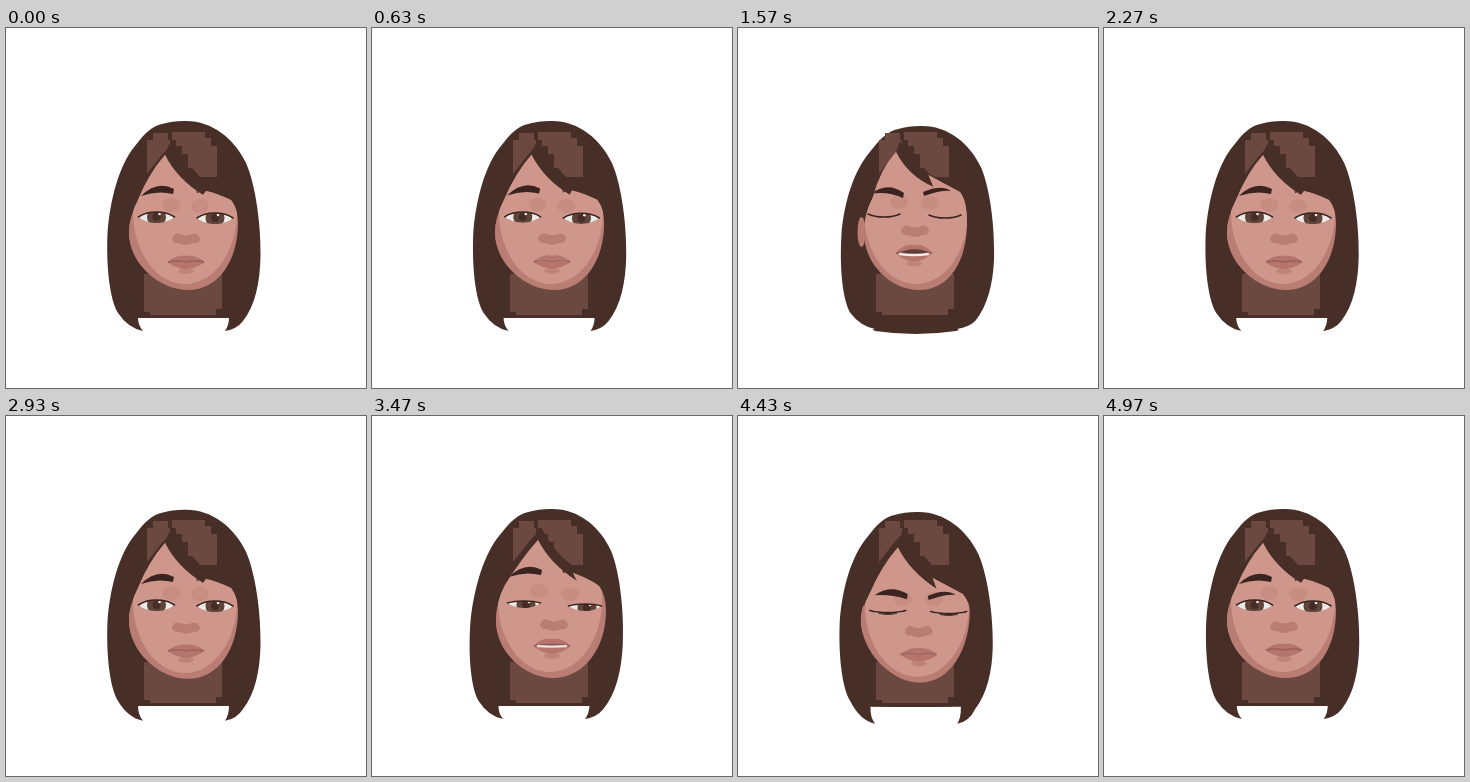
An HTML page that plays this animation: 360 by 360 pixels, repeating every 5 s.

```html
<!DOCTYPE html>
<html lang="en">
<head>
<meta charset="utf-8">
<title>Eye roll</title>
<style>
  html, body { margin: 0; width: 100%; height: 100%; overflow: hidden; background: #fff; }
  svg { display: block; width: 100%; height: 100%; }
  .hair { fill: #472e27; }
  .sheen { fill: #6b4840; }
  .shade { fill: #b97d73; }
  .skin { fill: #cf978b; }
  .white { fill: #eceae6; }
  .iris { fill: #60443a; }
  .pupil { fill: #452c25; }
  .brow { fill: #3b2420; }
  .lid { fill: none; stroke: #3a2420; stroke-width: 1.6; stroke-linecap: round; }
  .lip { fill: #b5756d; }
  .gap { fill: #35201e; }
  .seam { fill: none; stroke: #96605a; stroke-width: 1.3; }
  .teeth { fill: none; stroke: #f1eeeb; stroke-width: 2.4; stroke-linecap: round; }
</style>
</head>
<body>
<svg viewBox="0 0 360 360">
  <defs>
    <clipPath id="faceClip"><path id="faceEdge"/></clipPath>
    <clipPath id="eyeClipL"><path id="eyeEdgeL"/></clipPath>
    <clipPath id="eyeClipR"><path id="eyeEdgeR"/></clipPath>
  </defs>
  <path id="hair" class="hair"/>
  <path class="sheen" d="M147 105H162V112H164V118L155 128 141 146V112H147ZM166 104H199V110H205V118H211V149H194L186 140H182V126H176V118H170V112H166Z"/>
  <path class="sheen" d="M138 246H216V281H210V287H144V284H138Z"/>
  <path id="lock" class="hair"/>
  <ellipse id="ear" class="shade" rx="4" ry="15"/>
  <path id="face" class="shade"/>
  <g clip-path="url(#faceClip)">
    <ellipse id="glow" class="skin" rx="52" ry="72"/>
    <ellipse id="socketL" class="shade" rx="9" ry="7" opacity=".4"/>
    <ellipse id="socketR" class="shade" rx="9" ry="7" opacity=".4"/>
    <path id="nose" class="shade"/>
    <path id="browL" class="brow"/>
    <path id="browR" class="brow"/>
    <g clip-path="url(#eyeClipL)">
      <path id="whiteL" class="white"/>
      <circle id="irisL" class="iris" r="9.5"/>
      <circle id="pupilL" class="pupil" r="4"/>
      <circle id="glintL" class="white" r="1.3"/>
    </g>
    <g clip-path="url(#eyeClipR)">
      <path id="whiteR" class="white"/>
      <circle id="irisR" class="iris" r="9.5"/>
      <circle id="pupilR" class="pupil" r="4"/>
      <circle id="glintR" class="white" r="1.3"/>
    </g>
    <path id="lidL" class="lid"/>
    <path id="lidR" class="lid"/>
    <ellipse id="chin" class="shade" rx="8" ry="3" opacity=".7"/>
    <path id="lip" class="lip"/>
    <path id="seam" class="seam"/>
    <path id="gap" class="gap"/>
    <path id="teeth" class="teeth"/>
  </g>
</svg>
<script>
const FPS = 30, CYCLE = 80, LOOP = 5000;

const rest = {
  x: 0, lean: 0, top: 93, tip: 303, hem: 290, full: 0,  // hair
  px: 159, py: 127, tx: 197, ty: 167, nx: 3, ny: -4,    // parting, fringe tip, notch
  left: 123, right: 232, cx: 182, cy: 262, ear: 0,      // face
  ex: 150.5, ey: 189, fx: 209, fy: 190, half: 18,       // eyes
  up: -5, low: 6, ix: 0, iy: 0,                         // lids, gaze
  bx: 135, by: 168, bi: 161, arch: 152,                 // left brow
  rx: 190, ry: 161,                                     // right brow
  gx: 180, gy: 211, mx: 180, my: 233, open: 0, teeth: 0 // nose, mouth
};
const pose = (changes, base = rest) => ({ ...base, ...changes });

const dip = pose({ tip: 305, top: 94, cy: 263, gy: 212, my: 234 });
const droop = pose({
  x: -3, lean: .03, px: 166, py: 124, tx: 205, ty: 165, nx: -4, ny: -8,
  left: 124, right: 234, cx: 181,
  ex: 152, ey: 187, fx: 213, fy: 190, half: 16.5, up: -2, low: 5, ix: 2, iy: 2,
  bx: 137, by: 161, bi: 154, arch: 145, ry: 153,
  gx: 182, gy: 209, my: 229, open: 1.6, teeth: .9
});
const lookUp = pose({
  x: -3.5, lean: .05, top: 95, tip: 299, hem: 300, full: 1,
  px: 165.5, py: 117, tx: 205, ty: 157, nx: -2, ny: -6, left: 126, right: 235, cy: 261,
  ex: 152.5, ey: 176, fx: 214.5, fy: 178, up: -13, low: 10, ix: -3.5, iy: -3.5,
  bx: 146, by: 144, bi: 139, arch: 134, ry: 143,
  gx: 184, gy: 200, mx: 182, my: 222, open: 5, teeth: 1
});
const shut = pose({
  x: 2, lean: .02, top: 98, tip: 301, hem: 303, full: 1,
  px: 158, py: 124, tx: 195.5, ty: 159, nx: -5, ny: -12,
  left: 126, right: 229, cx: 181, ear: 1,
  ex: 146, ey: 186, fx: 207, fy: 187, half: 16, up: 3, low: 3,
  bx: 133, by: 166, bi: 165, arch: 153, rx: 185, ry: 164,
  gx: 177, gy: 203, mx: 176, my: 224, open: 3, teeth: 1
});
const swing = pose({ x: 4.5, tip: 304, my: 228, gy: 206, open: 1.5, teeth: .5 }, shut);
const lookDown = pose({
  top: 96, tip: 308, px: 160, py: 132, tx: 199, ty: 174, nx: -4, ny: -11, cy: 267,
  ex: 150, ey: 195, fx: 211, fy: 196, up: 2, low: 4.5, iy: 3,
  bx: 137, by: 180, bi: 179, arch: 169, ry: 181,
  gx: 181, gy: 216, mx: 181, my: 238
});

const keys = [
  [0, rest], [300, dip], [560, rest], [800, droop], [1080, lookUp], [1170, lookUp],
  [1540, shut], [1590, shut], [1640, swing], [1750, lookDown], [1800, lookDown],
  [1960, pose({ x: -2 })], [2240, rest], [2330, pose({ x: 1 })],
  [2500, pose({ x: 2 })], [2670, rest]
];

function poseAt(ms) {
  const i = keys.findIndex(k => k[0] > ms);
  const [t0, a] = keys[i - 1], [t1, b] = keys[i];
  const u = (ms - t0) / (t1 - t0), e = u * u * (3 - 2 * u);
  const p = {};
  for (const k in a) p[k] = a[k] + (b[k] - a[k]) * e;
  return p;
}

const el = {};
document.querySelectorAll("[id]").forEach(n => el[n.id] = n);
const path = (id, d) => el[id].setAttribute("d", d);
const place = (id, x, y) => {
  el[id].setAttribute("cx", x);
  el[id].setAttribute("cy", y);
};

function drawHair({ x, lean, top: t, tip, hem, full }) {
  const inset = 5 * full, bend = 6 * (1 - full);
  path("hair", `M178 ${t}C205 ${t - 1} 228 ${t + 17} 240 ${t + 42}
    C250 ${t + 65} 255 ${t + 105} 254.5 ${t + 135}C254 255 249 278 237 293
    Q231 ${tip - 2} 219 ${tip}Q223 ${tip - bend} ${223 - inset} ${hem}
    Q178 ${hem + 6 * full} ${132 + inset} ${hem}Q132 ${tip - bend} 137 ${tip}
    Q122 ${tip - 3} 112 285C104 272 100 240 101.5 205
    C104 172 113 ${t + 44} 129 ${t + 25}C139 ${t + 12} 146 ${t + 5} 156 ${t + 3}Q166 ${t} 178 ${t}Z`);
  el.hair.setAttribute("transform", `matrix(1 0 ${-lean} 1 ${x + 205 * lean} 0)`);
}

function drawFace(p) {
  const { px, py, tx, ty, left, right, cx, cy } = p;
  const edge = `M${px} ${py}Q${px - 16} ${py + 18} ${left + 9} ${py + 45}
    Q${left} ${py + 62} ${left} 205C${left} 236 ${cx - 28} ${cy} ${cx} ${cy}
    C${cx + 31} ${cy} ${right} 232 ${right} 195Q${right} ${ty + 14} ${right - 7} ${ty + 5}
    Q${tx + 13} ${ty - 2} ${tx + p.nx} ${ty + p.ny}L${tx} ${ty}
    Q${px + 12} ${py + 24} ${px} ${py}Z`;
  path("face", edge);
  path("faceEdge", edge);
  path("lock", `M${px} ${py}L${px + 4} ${py - 11}Q${px + 20} ${py + 20} ${tx + 8} ${ty - 8}L${tx} ${ty}Z`);
  place("glow", cx - 3, cy - 78);
  place("ear", left + 4 - 6.5 * p.ear, 204);
}

function drawEye(side, x, y, out, p) {
  const a = x - p.half, b = x + p.half;
  const curve = (from, to, bulge) => {
    const cy = y + bulge * 4 / 3, k = (to - from) / 4;
    return `C${from + k} ${cy} ${to - k} ${cy} ${to} ${y}`;
  };
  const upper = `M${a} ${y}` + curve(a, b, p.up);
  const shape = upper + curve(b, a, p.low) + "Z";
  path("white" + side, shape);
  path("eyeEdge" + side, shape);
  path("lid" + side, upper);
  const gx = x + p.ix, gy = y + p.iy;
  place("iris" + side, gx, gy);
  place("pupil" + side, gx, gy);
  place("glint" + side, gx + 3, gy - 3);
  place("socket" + side, x - 15 * out, y - 12);
}

function drawBrows({ bx, by, bi, arch, rx, ry }) {
  path("browL", `M${bx} ${by}Q${bx + 16} ${arch} ${bx + 33} ${bi}
    l-1 5Q${bx + 16} ${arch + 10} ${bx} ${by}Z`);
  path("browR", `M${rx + 28} ${ry - 1}Q${rx + 18} ${ry - 8} ${rx} ${ry}l1 4
    Q${rx + 18} ${ry - 2} ${rx + 28} ${ry - 1}Z`);
}

function drawMouth({ gx, gy, mx, my, open, teeth }) {
  const bottom = my + 8 + open / 2;
  path("nose", `M${gx - 14} ${gy}q2 -7 8 -5q6 3 12 0q6 -2 8 5q-1 5 -7 4q-7 4 -14 0q-6 1 -7 -4Z`);
  path("lip", `M${mx - 19} ${my + 1}Q${mx - 8} ${my - 7 - open} ${mx} ${my - 5 - open / 2}
    Q${mx + 8} ${my - 7 - open} ${mx + 19} ${my + 1}
    Q${mx + 9} ${bottom} ${mx} ${bottom}Q${mx - 9} ${bottom} ${mx - 19} ${my + 1}Z`);
  place("chin", mx, bottom + 2);
  path("seam", `M${mx - 18} ${my + 1}q10 -2 18 0q8 -2 18 0`);
  path("gap", `M${mx - 13} ${my}Q${mx} ${my - 2 * open} ${mx + 14} ${my}
    Q${mx} ${my + 1.3 * open} ${mx - 13} ${my}Z`);
  path("teeth", `M${mx - 14} ${my + open * .7}q14 ${open * .6} 28 0`);
  el.teeth.style.opacity = teeth;
  el.gap.style.opacity = Math.min(1, open / 5);
}

function frame(now) {
  const step = Math.floor((now % LOOP) * FPS / 1000);
  const p = poseAt(step % CYCLE * 1000 / FPS);
  drawHair(p);
  drawFace(p);
  drawEye("L", p.ex, p.ey, -1, p);
  drawEye("R", p.fx, p.fy, 1, p);
  drawBrows(p);
  drawMouth(p);
  requestAnimationFrame(frame);
}
frame(performance.now());
</script>
</body>
</html>
```
